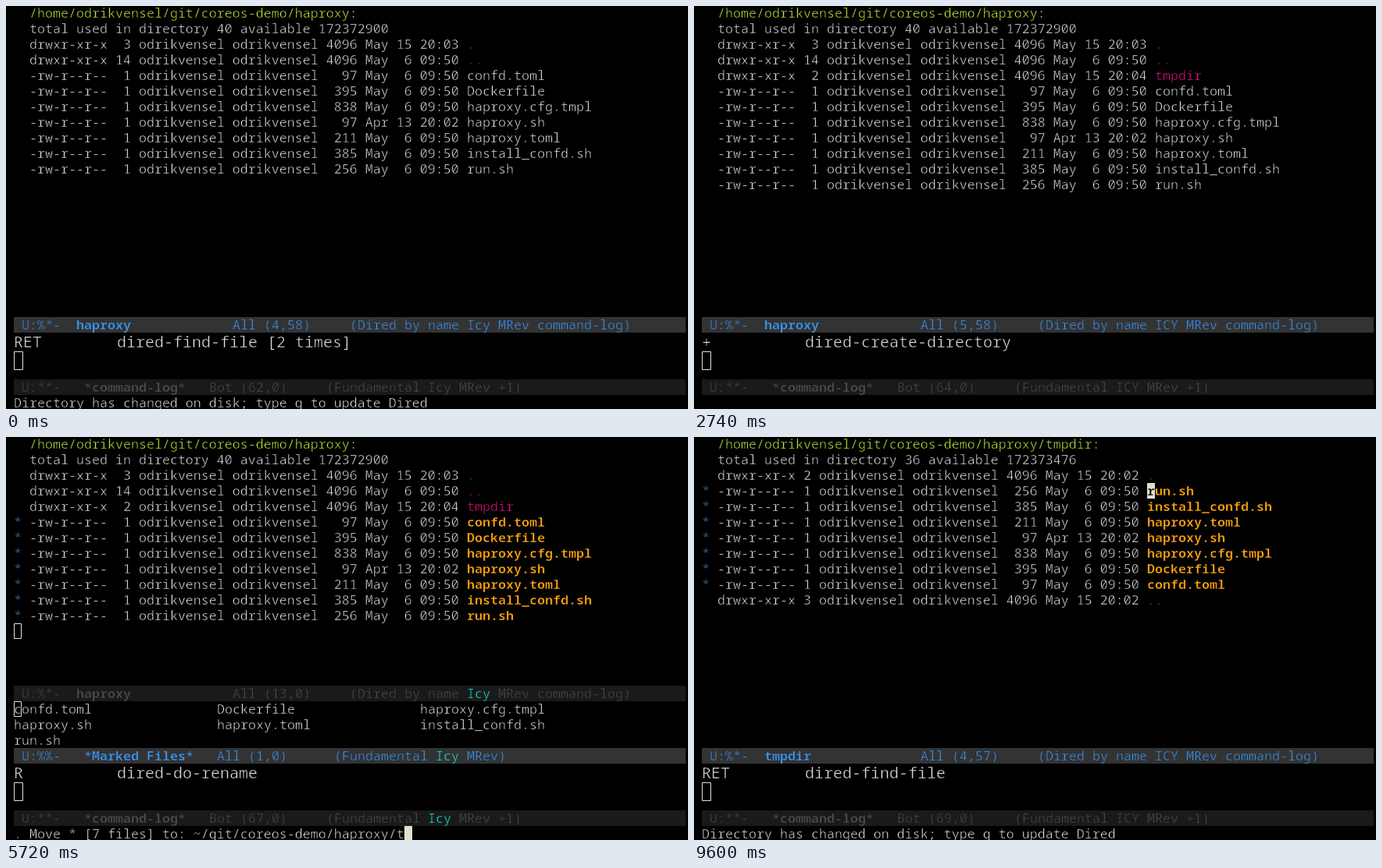
Recreate the animation shown at these times as an HTML page with a canvas. Size 873 by 517 pixels, loop 9690 ms.

```html
<!DOCTYPE html>
<html lang="en">
<head>
<meta charset="utf-8">
<title>Dired session</title>
<style>
  html, body { margin: 0; width: 100%; height: 100%; overflow: hidden; background: #000; }
  canvas { display: block; }
</style>
</head>
<body>
<canvas id="screen" width="873" height="517"></canvas>
<script>
const ctx = document.getElementById('screen').getContext('2d');
const LOOP = 9690, CELL = 10, LINE = 20, LEFT = 10, TOP = -1;
const FACE = '"Noto Sans Mono", "Liberation Mono", monospace';
const FONT = { thin: `300 16.667px ${FACE}`, bold: `700 16.667px ${FACE}`, log: `300 20px ${FACE}` };
const C = {
  paper: '#000', text: '#e0e0e0', path: '#c4ec3c', dir: '#f0147c', dots: '#d01838', marked: '#ffa60c',
  star: '#4a94dc', cursor: '#e0e0d0', cyan: '#14f0f0',
  active: { bg: '#333333', fg: '#3898f8' }, idle: { bg: '#1a1a1a', fg: '#4c4c4c' }
};

const USER = 'odrikvensel';
const HOME = '~/git/coreos-demo/haproxy/';
const PATH = `/home/${USER}/git/coreos-demo/haproxy`;
const CHANGED = 'Directory has changed on disk; type g to update Dired';

// [name, size, date, links]; directories carry a link count
const FILES = [
  ['confd.toml', 97], ['Dockerfile', 395], ['haproxy.cfg.tmpl', 838],
  ['haproxy.sh', 97, 'Apr 13 20:02'], ['haproxy.toml', 211],
  ['install_confd.sh', 385], ['run.sh', 256]
];
const TMPDIR = ['tmpdir', 4096, 'May 15 20:04', 2];
const PARENTS = [['.', 4096, 'May 15 20:03', 3], ['..', 4096, 'May  6 09:50', 14]];
const INSIDE = [
  ['.', 4096, 'May 15 20:02', 2], ...FILES.slice().reverse(), ['..', 4096, 'May 15 20:02', 3]
];

const timeline = [];
const at = (time, change) => timeline.push({ time, change });

at(0, {
  entries: [...PARENTS, ...FILES], marks: 0, inside: false, popup: false,
  row: 3, col: 58, cursor: 'off', key: 'RET', command: 'dired-find-file [2 times]', logLine: 62,
  icyTop: 'Icy', icyLog: 'Icy', echo: CHANGED, prompt: '', input: '', note: ''
});
at(120, { row: 4, cursor: 'solid', key: 'n', command: 'dired-next-line', logLine: 63 });
at(160, { echo: '' });
at(610, { cursor: 'off' });
at(1100, { cursor: 'solid', key: '+', command: 'dired-create-directory', logLine: 64 });
at(1140, { cursor: 'hollow', prompt: 'Create directory: ', input: HOME });
at(1180, { icyTop: 'lit', icyLog: 'lit' });
for (let i = 1; i <= 6; i++) at(1460 + (i - 1) * 116, { input: HOME + 'tmpdir'.slice(0, i) });
at(2190, { prompt: '', icyTop: 'ICY', icyLog: 'ICY' });
at(2230, { entries: [...PARENTS, TMPDIR, ...FILES], cursor: 'solid' });
at(2740, { cursor: 'off' });
at(3240, { cursor: 'solid' });
at(3280, { row: 5, key: 'n', command: 'dired-next-line', logLine: 65 });
at(3650, { marks: 1, row: 6, key: 'm', command: 'dired-mark', logLine: 66 });
for (let n = 2; n <= 7; n++) {
  const time = n < 7 ? 3860 + (n - 2) * 152 : 4730;
  at(time, { marks: n, row: 5 + n, col: n < 7 ? 58 : 0, command: `dired-mark [${n} times]` });
}
at(5220, { key: 'R', command: 'dired-do-rename', logLine: 67 });
at(5300, { popup: true, cursor: 'hollow' });
at(5350, { prompt: 'Move * [7 files] to: ', input: HOME });
at(5390, { icyTop: 'lit', icyLog: 'lit' });
[5720, 5800, 5890, 6040, 6170].forEach((time, i) => at(time, { input: HOME + 'tmpdir'.slice(0, i + 1) }));
at(6350, { input: HOME + 'tmpdir/' });
at(6390, { note: '  [Sole prefix completion]' });
for (let i = 0; i < 4; i++) {
  at(7120 + i * 40, { prompt: '', note: '', icyTop: 'ICY', echo: `Move: ${i * 2 + 1} of 7` });
}
at(7280, { echo: 'Move: 7 files' });
at(7320, {
  entries: [...PARENTS, TMPDIR], marks: 0, popup: false, row: 5, cursor: 'solid', icyLog: 'ICY'
});
at(7800, { cursor: 'off' });
at(8300, { cursor: 'solid' });
at(8800, { row: 4, col: 58, key: 'p', command: 'dired-previous-line', logLine: 68 });
at(8840, { echo: '' });
at(9290, { cursor: 'off' });
at(9550, { cursor: 'solid', key: 'RET', command: 'dired-find-file', logLine: 69 });
at(9600, { entries: INSIDE, inside: true, marks: 7, row: 3, col: 57, echo: CHANGED });

const x = col => LEFT + col * CELL;
const y = row => TOP + row * LINE;

// An outline in the paper colour slims the letters to hairline strokes.
function print(left, baseline, text, color, font, paper) {
  ctx.font = font;
  ctx.fillStyle = color;
  ctx.fillText(text, left, baseline);
  ctx.strokeStyle = paper;
  ctx.lineWidth = 0.45;
  ctx.lineJoin = 'round';
  ctx.strokeText(text, left, baseline);
}

function write(row, col, text, color = C.text, font = FONT.thin, paper = C.paper) {
  print(x(col), y(row) + 16, text, color, font, paper);
}

function block(row, col) {
  ctx.fillStyle = C.cursor;
  ctx.fillRect(x(col), y(row), CELL, LINE);
}

function frame(left, top, width, height) {
  ctx.strokeStyle = C.cursor;
  ctx.lineWidth = 1;
  ctx.strokeRect(left + 0.5, top + 0.5, width - 1, height - 1);
}

function modeLine(row, look, { flags, name, nameCol, placeCol, place, mode, icy, tail }) {
  ctx.fillStyle = look.bg;
  ctx.fillRect(LEFT, y(row), 860, LINE);
  const put = (col, text, color = look.fg, font = FONT.thin) => write(row, col, text, color, font, look.bg);
  const lit = icy === 'lit', modeCol = placeCol + 15, icyCol = modeCol + mode.length;
  put(1, flags);
  put(nameCol, name, look.fg, FONT.bold);
  put(placeCol, place);
  put(modeCol, mode);
  put(icyCol, lit ? 'Icy' : icy, lit ? C.cyan : look.fg);
  put(icyCol + 4, tail);
}

function listing(s) {
  const linkWidth = s.inside ? 1 : 2, nameCol = 56 + linkWidth;
  write(0, 2, PATH + (s.inside ? '/tmpdir:' : ':'), C.path);
  write(1, 2, 'total used in directory ' + (s.inside ? '36 available 172373476' : '40 available 172372900'));

  let fileCount = 0;
  s.entries.forEach(([name, size, date = 'May  6 09:50', links], i) => {
    const row = i + 2;
    const marked = !links && fileCount++ < s.marks;
    const perms = links ? 'drwxr-xr-x' : '-rw-r--r--';
    const font = marked ? FONT.bold : FONT.thin;
    const color = marked ? C.marked : !links ? C.text : name[0] === '.' ? C.dots : C.dir;
    write(row, 2, [
      perms, String(links || 1).padStart(linkWidth), USER, USER, String(size).padStart(4), date
    ].join(' '));
    if (marked) write(row, 0, '*', C.star);
    write(row, nameCol, name, color, font);
    if (s.row === row && s.cursor === 'solid' && s.col === nameCol) {
      block(row, s.col);
      write(row, s.col, name[0], C.paper, font, C.cursor);
    }
  });

  if (s.cursor === 'solid' && s.col === 0) block(s.row, 0);
  if (s.cursor === 'hollow') frame(x(s.col), y(s.row), CELL, LINE);
}

function markedFiles() {
  FILES.forEach(([name], i) => write(17 + Math.floor(i / 3), i % 3 * 26, name));
  frame(x(0), y(17), CELL, LINE);
  modeLine(20, C.active, {
    flags: 'U:%%-', name: '*Marked Files*', nameCol: 9, placeCol: 26, place: 'All (1,0)',
    mode: '(Fundamental ', icy: 'lit', tail: 'MRev)'
  });
}

function commandLog(s) {
  print(LEFT, 438, s.key, C.text, FONT.log, C.paper);
  print(LEFT + 11 * 12, 438, s.command, C.text, FONT.log, C.paper);
  frame(LEFT, 443, 12, 24);
  modeLine(24, C.idle, {
    flags: 'U:**-', name: '*command-log*', nameCol: 9, placeCol: 25, place: `Bot (${s.logLine},0)`,
    mode: '(Fundamental ', icy: s.icyLog, tail: 'MRev +1)'
  });
}

function minibuffer(s) {
  if (!s.prompt) return write(25, 0, s.echo);
  const line = s.prompt + s.input;
  write(25, 0, '.', C.cyan);
  write(25, 2, line + s.note);
  block(25, 2 + line.length);
}

function draw(time) {
  const s = {};
  for (const step of timeline) if (step.time <= time) Object.assign(s, step.change);
  ctx.fillStyle = C.paper;
  ctx.fillRect(0, 0, 873, 517);
  listing(s);
  modeLine(s.popup ? 16 : 20, s.popup ? C.idle : C.active, {
    flags: 'U:%*-', name: s.inside ? 'tmpdir' : 'haproxy', nameCol: 8, placeCol: 28,
    place: `All (${s.row + 1},${s.col})`, mode: '(Dired by name ', icy: s.icyTop, tail: 'MRev command-log)'
  });
  if (s.popup) markedFiles();
  commandLog(s);
  minibuffer(s);
}

const start = performance.now();
function tick() {
  draw((performance.now() - start) % LOOP);
  requestAnimationFrame(tick);
}
tick();
</script>
</body>
</html>
```
